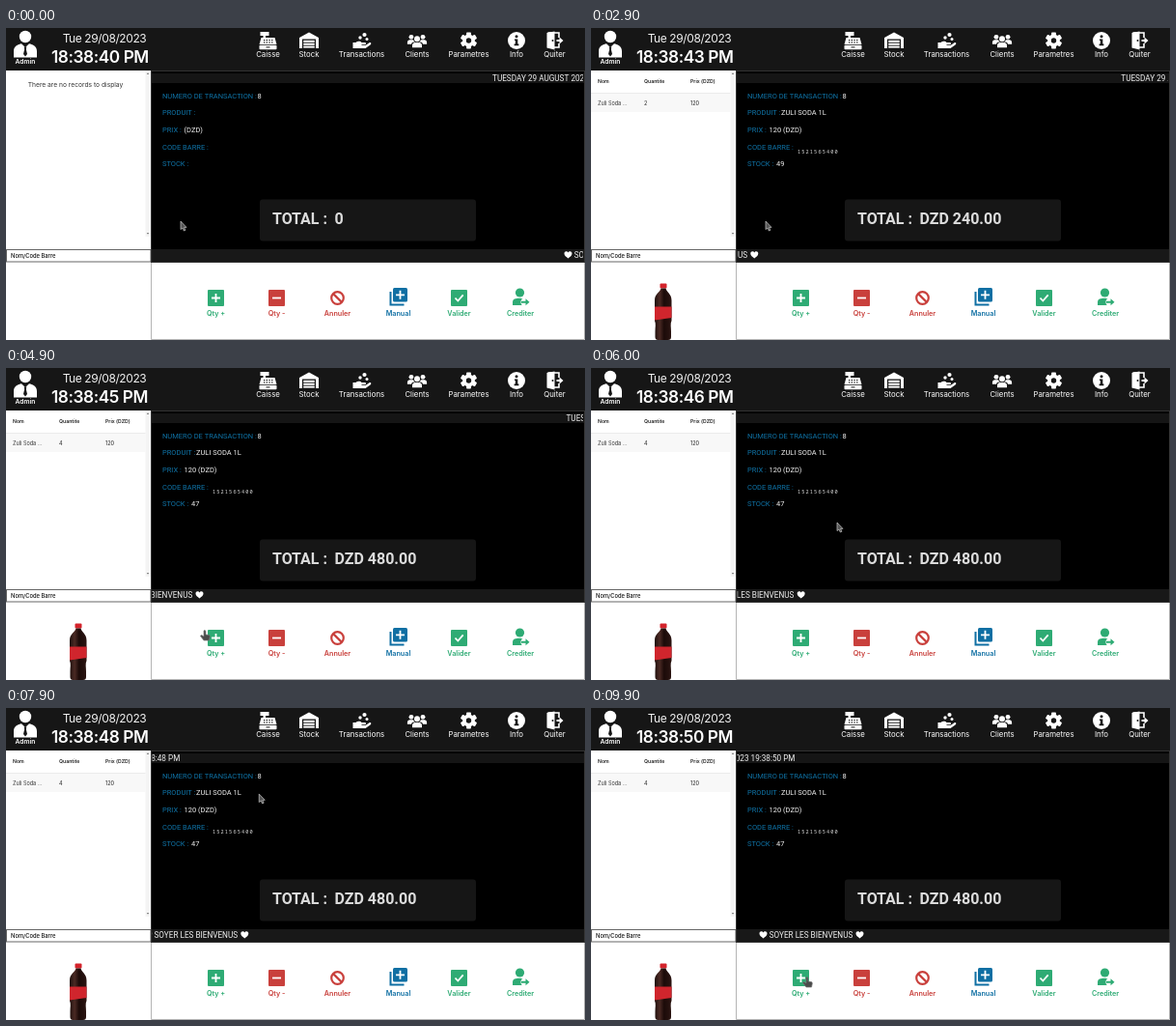
Animation of 600 by 323 pixels, one loop 10000 ms. Source, as an HTML page with a canvas:

```html
<!DOCTYPE html>
<html lang="fr">
<head>
<meta charset="utf-8">
<title>Caisse</title>
<style>
html, body { margin: 0; width: 100%; height: 100%; overflow: hidden; background: #fff; }
canvas { display: block; width: 600px; height: 323px; }
</style>
</head>
<body>
<canvas id="stage"></canvas>
<script>
const W = 600, H = 323, LOOP = 10000, SPEED = 15.6;
const UI = 'Inter, "Open Sans", sans-serif', LCD = 'Roboto, sans-serif';
const GREEN = '#2eab74', RED = '#c9403c', BLUE = '#0f6fa3', DARK = '#161616', LABEL = '#0f74a8';

const canvas = document.getElementById('stage');
const g = canvas.getContext('2d');
const dpr = window.devicePixelRatio || 1;
canvas.width = W * dpr;
canvas.height = H * dpr;

function rect(x, y, w, h, color) {
  g.fillStyle = color;
  g.fillRect(x, y, w, h);
}

function box(x, y, w, h, r, color) {
  g.fillStyle = color;
  g.beginPath();
  g.roundRect(x, y, w, h, r);
  g.fill();
}

function disc(x, y, r, color) {
  g.fillStyle = color;
  g.beginPath();
  g.arc(x, y, r, 0, Math.PI * 2);
  g.fill();
}

function shape(d, color) {
  g.fillStyle = color;
  g.fill(new Path2D(d));
}

function line(d, color, width) {
  g.strokeStyle = color;
  g.lineWidth = width;
  g.stroke(new Path2D(d));
}

function text(str, x, y, font, color, align = 'left', gap = 0) {
  g.font = font;
  g.fillStyle = color;
  g.textAlign = align;
  g.letterSpacing = gap + 'px';
  g.fillText(str, x, y);
}

function at(x, y, draw) {
  g.save();
  g.translate(x, y);
  draw();
  g.restore();
}

function person(x, y, s, color) {
  at(x, y, () => {
    g.scale(s, s);
    disc(0, -3, 3, color);
    shape('M-5 6 V4 C-5 1 -3 .7 0 .7 S5 1 5 4 V6 Z', color);
  });
}

function heart(x, y) {
  at(x, y, () => shape('M4 7.3 C2 5.6 0 4.2 0 2.2 C0 -.4 3.2 -.7 4 1.3 C4.8 -.7 8 -.4 8 2.2 C8 4.2 6 5.6 4 7.3 Z', '#fff'));
}

const menu = [
  ['Caisse', 271.5, () => {
    rect(-8, -9, 9, 4, '#fff');
    rect(-5, -5, 2.5, 3, '#fff');
    shape('M-7 -3 H7 L9 4 H-9 Z', '#fff');
    box(-9, 4.8, 18, 4.4, 1, '#fff');
    for (let i = 0; i < 8; i++) rect(-4.5 + (i % 4) * 2.7, -1 + (i >> 2) * 2.4, 1.3, 1.2, DARK);
    rect(-2, 6.4, 4, 1, DARK);
  }],
  ['Stock', 314, () => {
    shape('M-10 -3 L0 -8.5 L10 -3 V8 H7 V-1.5 H-7 V8 H-10 Z', '#fff');
    for (let i = 0; i < 3; i++) rect(-5.8, -.2 + i * 2.9, 11.6, 2, '#fff');
  }],
  ['Transactions', 368.5, () => {
    disc(3, -6, 2.1, '#fff');
    disc(-1.5, -3, 1.7, '#fff');
    disc(5.5, -1.5, 1.5, '#fff');
    shape('M-9 2 H-6 C-3 0 -1 1 0 2 H3 C5 2 5 4.3 3 4.3 H0 V5 H4 L8 2.2 C10 1.6 10.4 3.4 9 4.5 L4 8 H-9 Z', '#fff');
  }],
  ['Clients', 426, () => {
    person(-6, -1.2, .82, '#fff');
    person(6, -1.2, .82, '#fff');
    disc(0, -1.8, 3.8, DARK);
    box(-6, 1.4, 12, 7, 3, DARK);
    person(0, 1.2, 1, '#fff');
  }],
  ['Parametres', 479.5, () => {
    for (let i = 0; i < 3; i++) {
      g.save();
      g.rotate(i * Math.PI / 3);
      box(-2.4, -8.6, 4.8, 17.2, .8, '#fff');
      g.restore();
    }
    disc(0, 0, 6.4, '#fff');
    disc(0, 0, 2.7, DARK);
  }],
  ['Info', 529, () => {
    disc(0, 0, 9, '#fff');
    disc(0, -4.3, 1.5, DARK);
    shape('M-2 -1.6 H1.3 V3.6 H2.4 V5.2 H-2.4 V3.6 H-1.2 V0 H-2 Z', DARK);
  }],
  ['Quiter', 568.5, () => {
    shape('M-8 -8 L0 -9.5 V9.5 L-8 7.5 Z', '#fff');
    disc(-2, 0, 1, DARK);
    line('M-7 -8 H4.5 V-3 M4.5 3 V7 H-7', '#fff', 1.6);
    shape('M2 -1 H5 V-3.5 L9 0 L5 3.5 V1 H2 Z', '#fff');
  }]
];

const buttons = [
  ['Qty +', 217.5, GREEN, () => {
    box(-8.5, -8.5, 17, 17, 1, GREEN);
    line('M-4.5 0 H4.5 M0 -4.5 V4.5', '#fff', 1.8);
  }],
  ['Qty -', 280.5, RED, () => {
    box(-8.5, -8.5, 17, 17, 1, RED);
    line('M-4.5 0 H4.5', '#fff', 1.8);
  }],
  ['Annuler', 343.5, RED, () => {
    g.strokeStyle = RED;
    g.lineWidth = 2.2;
    g.beginPath();
    g.arc(0, 0, 6.3, 0, Math.PI * 2);
    g.stroke();
    line('M-4.4 -4.4 L4.4 4.4', RED, 2.2);
  }],
  ['Manual', 406.5, BLUE, () => {
    line('M-8 -6.5 V7 H6', BLUE, 2);
    box(-5.5, -10.5, 15, 14.5, 1.5, BLUE);
    line('M-2.5 -3.2 H6.5 M2 -7.7 V1.3', '#fff', 1.8);
  }],
  ['Valider', 469.5, GREEN, () => {
    box(-8.5, -8.5, 17, 17, 1, GREEN);
    line('M-4 0 L-1.2 3 L4.2 -3.2', '#fff', 1.8);
  }],
  ['Crediter', 533, GREEN, () => {
    disc(-.5, -5.5, 4.6, GREEN);
    shape('M-8 7.5 V4.5 C-8 1 -5 .3 -1 .3 C3 .3 6 1 6 4.5 V7.5 Z', GREEN);
    disc(5, 4.3, 4.6, '#fff');
    shape('M1 3.3 H5.5 V.8 L9.5 4.3 L5.5 7.8 V5.3 H1 Z', GREEN);
  }]
];

function header(sec) {
  rect(0, 0, W, 44, DARK);
  disc(20, 9, 6.2, '#fff');
  shape('M8 30.5 V24 C8 18.5 13 17 16 16.3 L20 20 L24 16.3 C27 17 32 18.5 32 24 V30.5 Z', '#fff');
  shape('M18.7 19.5 H21.3 L20.8 22 L22 27 L20 29.5 L18 27 L19.2 22 Z', DARK);
  text('Admin', 20, 37.3, '600 6.7px ' + UI, '#fff', 'center');
  text('Tue 29/08/2023', 102, 15.3, '400 12px ' + UI, '#f2f2f2', 'center', -.4);
  text('18:38:' + sec + ' PM', 47, 35.5, '600 17.3px ' + UI, '#fff', 'left', -.45);
  for (const [name, x, icon] of menu) {
    at(x, 13, icon);
    text(name, x, 30.4, '400 7.8px ' + UI, '#fff', 'center');
  }
}

function bottle() {
  const body = g.createLinearGradient(65.5, 0, 84, 0);
  body.addColorStop(0, '#190c0a');
  body.addColorStop(.3, '#4b2a24');
  body.addColorStop(.55, '#1c0b09');
  body.addColorStop(1, '#2c1512');
  box(71.5, 264.5, 7, 5, 1, '#d3222b');
  shape('M72.5 269.5 H77.5 C78 273 83.5 275 83.5 282 V303 C82 306 83 310 83 314 V320 C83 322 82 323 80 323 H69.5 C67.5 323 66.5 322 66.5 320 V314 C66.5 310 67.5 306 66 303 V282 C66 275 72 273 72.5 269.5 Z', body);
  shape('M66 288.5 H83.5 V300 L66 302.5 Z', '#d0252d');
}

function leftPane(t, qty) {
  const head = '600 5.2px ' + UI, cell = '400 5.5px ' + UI;
  rect(0, 44, 150, 279, '#fff');
  rect(144.5, 44, 5, 172, '#f4f4f4');
  shape('M145.8 48 L147 46.3 L148.2 48 Z M145.8 212 L147 213.7 L148.2 212 Z', '#777');
  if (qty) {
    rect(0, 67, 144.5, .7, '#e4e4e4');
    rect(0, 68, 144.5, 19, '#f8f8f8');
    text('Nom', 7, 57, head, '#222');
    text('Quantite', 55, 57, head, '#222');
    text('Prix (DZD)', 103, 57, head, '#222');
    text('Zuli Soda ...', 7, 79.8, cell, '#333');
    text(String(qty), 55, 79.8, cell, '#222');
    text('120', 103, 79.8, cell, '#222');
    bottle();
  } else {
    text('There are no records to display', 72, 61.3, '400 6.7px ' + UI, '#333', 'center');
  }
  g.strokeStyle = '#666';
  g.lineWidth = 1;
  g.strokeRect(.5, 229.5, 149.5, 12.5);
  text('Nom/Code Barre', 5, 238, '500 5.8px ' + UI, '#111');
  const blink = (t - 1.15 + 2.12) % 1.06 < .53;
  if (t < 4.2 && blink) rect(5, 232, .8, 8, '#000');
}

function tickers(t, sec) {
  const font = '400 8.2px ' + LCD;
  rect(151, 47, 448, 10, '#151515');
  rect(151, 229, 448, 13, '#181818');
  g.save();
  g.beginPath();
  g.rect(151.5, 44, 446.5, 199);
  g.clip();

  const date = 'TUESDAY 29 AUGUST 2023 19:38:' + sec + ' PM';
  if (t < 5.94) text(date, 504 + SPEED * t, 54.7, font, '#eee');
  else text(date, 211.5 - SPEED * (9.9 - t), 54.7, font, '#eee', 'right');

  const x = t < 1.36 ? 578 + SPEED * t : 174 - SPEED * (9.9 - t);
  heart(x + .5, 231.3);
  text('SOYER LES BIENVENUS', x + 10.7, 238.3, font, '#eee');
  heart(x + 100.5, 231.3);
  g.restore();
}

function display(t, sec, qty, stock) {
  const font = '400 7.5px ' + LCD;
  rect(150, 44, 450, 199, '#000');
  tickers(t, sec);
  g.strokeStyle = '#333';
  g.lineWidth = 1;
  g.strokeRect(150.5, 44.5, 449, 198);
  const rows = [
    ['NUMERO DE TRANSACTION :', 72.8, 260.5, '8'],
    ['PRODUIT :', 89.8, 197, qty ? 'ZULI SODA 1L' : ''],
    ['PRIX :', 107.8, 184.5, qty ? '120 (DZD)' : '(DZD)'],
    ['CODE BARRE :', 125.8, 0, ''],
    ['STOCK :', 142.8, 192, qty ? String(stock) : '']
  ];
  for (const [label, y, x, value] of rows) {
    text(label, 162, y, font, LABEL);
    text(value, x, y, font, '#f2f2f2');
  }
  if (qty) text('1521565400', 214, 130.3, '400 5.3px "Noto Sans Mono", monospace', '#ddd', 'left', 1.1);

  box(263, 177.5, 224, 43, 3, '#161616');
  text('TOTAL :', 276, 202.8, '700 16px ' + LCD, '#dcdcdc');
  text(qty ? 'DZD ' + qty * 120 + '.00' : '0', 340.5, 202.8, '700 16px ' + LCD, '#dcdcdc');
}

function actions() {
  rect(150, 243, 450, 80, '#fff');
  line('M150.5 243 V322.5 H599.5 V243', '#b5b5b5', 1);
  for (const [name, x, color, icon] of buttons) {
    at(x, 279.5, icon);
    text(name, x, 298, '600 7.2px ' + UI, color, 'center');
  }
}

// Pointer stops: seconds, x, y
const path = [
  [0, 181, 200], [3.5, 181, 200], [4.1, 205, 272], [5.2, 205, 272],
  [5.6, 222, 222], [6.4, 288, 98], [6.8, 293, 83], [7.2, 293, 83],
  [7.8, 268, 88], [8.4, 190, 101], [8.7, 186, 103], [8.9, 190, 106],
  [9.35, 308, 195], [9.8, 223, 279], [10, 223, 279]
];

function pointer(t) {
  const i = Math.max(1, path.findIndex(p => p[0] > t));
  const [t0, x0, y0] = path[i - 1], [t1, x1, y1] = path[i];
  const k = (t - t0) / (t1 - t0), e = k * k * (3 - 2 * k);
  const x = x0 + (x1 - x0) * e, y = y0 + (y1 - y0) * e;
  const hand = y > 268 && x > 196 && x < 228;
  at(x, y, () => {
    const d = hand
      ? 'M0 0 C1 -1 2 0 2 1 V4 L5.5 4.6 Q6.5 5 6.3 6.5 L5.5 10 H0 L-3.5 5.5 Q-3 4 -1.5 5 L0 6 Z'
      : 'M0 0 V8.6 L2 7 L3.3 10 L4.9 9.3 L3.6 6.4 H6 Z';
    shape(d, hand ? '#4a4a4a' : '#555');
    line(d, hand ? '#777' : '#c8c8c8', .7);
  });
}

function draw(ms) {
  const t = Math.floor((ms % LOOP) / 100 + 1e-4) / 10;
  const sec = 40 + Math.floor(t + .5);
  const qty = [.7, 2, 4.3, 4.7].filter(s => t >= s).length;
  const stock = qty > 2 ? 51 - qty : 49;
  g.setTransform(dpr, 0, 0, dpr, 0, 0);
  rect(0, 0, W, H, '#fff');
  header(sec);
  leftPane(t, qty);
  display(t, sec, qty, stock);
  actions();
  pointer(t);
}

const start = performance.now();
function tick() {
  draw(performance.now() - start);
  requestAnimationFrame(tick);
}
tick();
</script>
</body>
</html>
```
